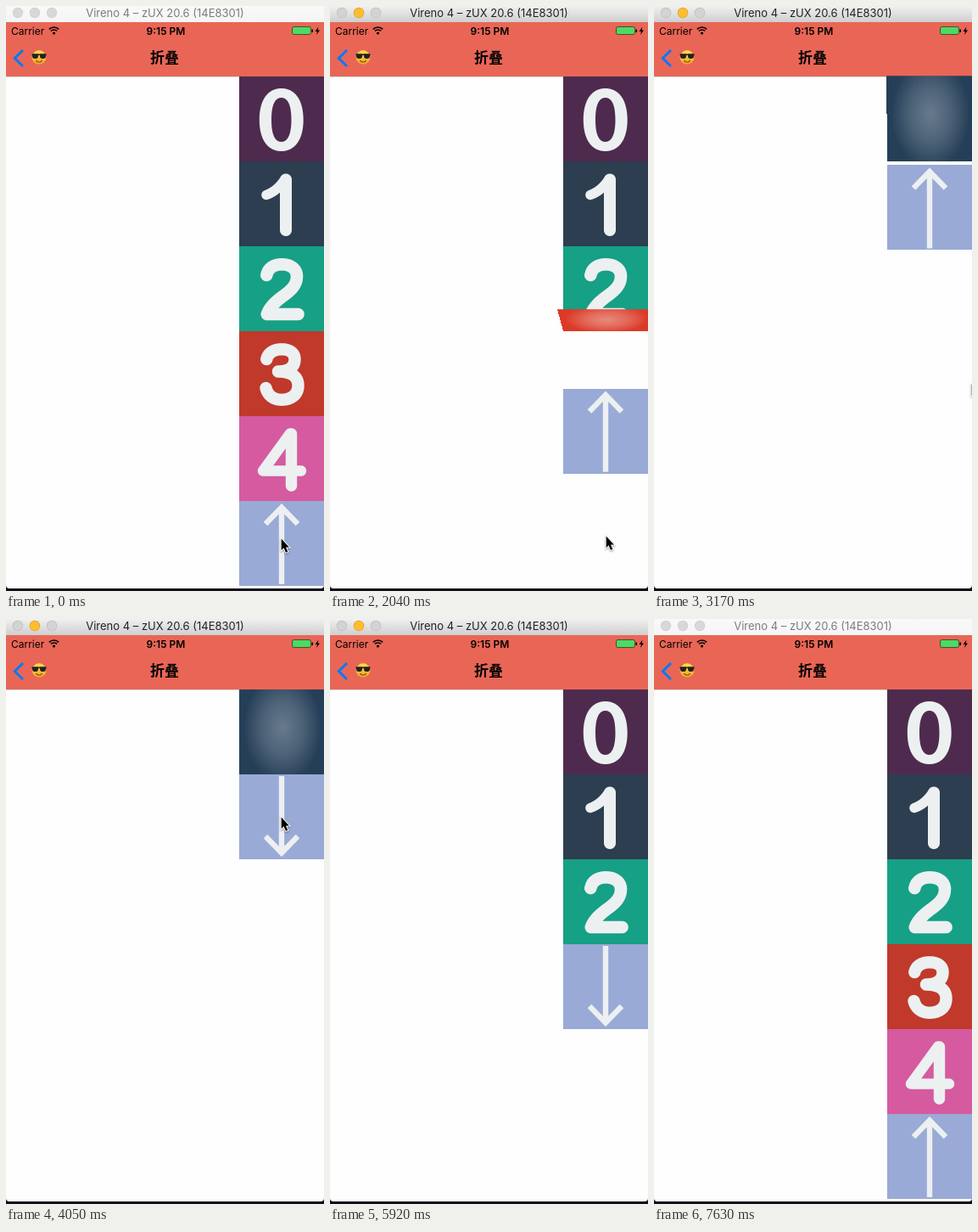
An HTML page with a canvas that plays this animation: 375x689 px, repeating every 7670 ms.

```html
<!DOCTYPE html>
<html lang="zh">
<head>
<meta charset="utf-8">
<title>折叠</title>
<style>
html, body { margin: 0; width: 100%; height: 100%; overflow: hidden; background: #fff; }
canvas { display: block; width: 375px; height: 689px; }
</style>
</head>
<body>
<canvas id="stage" width="375" height="689"></canvas>
<script>
const ctx = document.getElementById('stage').getContext('2d');
const LOOP = 7670;
const SIZE = 100, LEFT = 275, TOP = 83, DEPTH = 800;
const FOLD_MS = 448;
const CLOSE_FLAP = [1281, 1798, 2315, 2790];
const CLOSE_ARROW = [1327, 1864, 2402, 2790];
const OPEN_ARROW = [4910, 5418, 5927, 6331];
const OPEN_LEAD = 12;
const OPEN_FROM = 4500;
const INK = '#ecf0f1';

const FRONT = ['#4e2b4e', '#2d3e50', '#16a085', '#c0392b', '#d65a9f'];
const BACK = [null, ['#263f58', '#687b8d'], ['#00b08b', '#4dc4a8'], ['#dc3a28', '#e88a7c'], ['#fb4aac', '#f596c8']];

const clamp = v => Math.max(0, Math.min(1, v));

// Standard ease-in-out: cubic-bezier(.42, 0, .58, 1)
function ease(x) {
  x = clamp(x);
  let lo = 0, hi = 1;
  for (let i = 0; i < 20; i++) {
    const m = (lo + hi) / 2, n = 1 - m;
    if (1.26 * n * n * m + 1.74 * n * m * m + m * m * m < x) lo = m; else hi = m;
  }
  return lo * lo * (3 - 2 * lo);
}
const foldAt = (t, start) => ease((t - start) / FOLD_MS);
const total = (t, starts) => starts.reduce((sum, s) => sum + foldAt(t, s), 0);

function makeTile(color, paint) {
  const c = document.createElement('canvas');
  c.width = c.height = SIZE * 2;
  const g = c.getContext('2d');
  g.scale(2, 2);
  g.fillStyle = color;
  g.fillRect(0, 0, SIZE, SIZE);
  g.strokeStyle = g.fillStyle = INK;
  g.lineCap = g.lineJoin = 'round';
  paint(g);
  return c;
}

function stroke(g, path, width) {
  g.lineWidth = width;
  g.stroke(new Path2D(path));
}

const DIGITS = [
  g => g.fill(new Path2D(
    'M49.7 14C66 14 75.7 28 75.7 51S66 88 49.7 88S23.8 74 23.8 51S33.5 14 49.7 14Z' +
    'M49.7 25C42 25 38 34 38 51S42 77 49.7 77S61.5 68 61.5 51S57.5 25 49.7 25Z'), 'evenodd'),
  g => {
    stroke(g, 'M55 21.5V81', 14);
    stroke(g, 'M54 21Q45 35 32 39.5', 11.5);
  },
  g => stroke(g, 'M32.3 34C34 25.5 41 21.3 50.5 21.3C61 21.3 68 27 68 35.5C68 45 62 51 54 57C44 64 36 71 32.8 80H69.5', 14.6),
  g => stroke(g, 'M32.3 33C34 25.5 41 21.3 50 21.3C60 21.3 65.5 26 65.5 33C65.5 42 59 47.5 46 47.5C61 47.5 69.5 53 69.5 64C69.5 75 61 80.8 50 80.8C40 80.8 33.5 75 31.5 67', 14.4),
  g => {
    stroke(g, 'M61.5 21V82', 13.4);
    stroke(g, 'M60 20.5L28 64.5H73', 12.4);
  }
];

const fronts = FRONT.map((color, i) => makeTile(color, DIGITS[i]));
const backs = BACK.map(pair => pair && makeTile(pair[0], g => {
  const glow = g.createRadialGradient(0, 0, 0, 0, 0, 46);
  glow.addColorStop(0, pair[1]);
  glow.addColorStop(0.5, pair[1] + '99');
  glow.addColorStop(1, pair[1] + '00');
  g.translate(51, 55);
  g.scale(1, 1.4);
  g.fillStyle = glow;
  g.fillRect(-60, -50, 120, 100);
}));
const arrow = makeTile('#9aaad6', g => {
  g.lineCap = 'butt';
  g.lineJoin = 'miter';
  stroke(g, 'M50 8V98M31 27L50 7.5L69 27', 6.4);
});

const flat = (tile, y) => ctx.drawImage(tile, LEFT, y, SIZE, SIZE);

// Draws a tile hinged on a horizontal edge, one pixel row at a time.
function flap(tile, hinge, angle, depth) {
  const c = Math.cos(angle), n = Math.sin(angle) / depth;
  const end = SIZE * c / (1 - SIZE * n), dir = Math.sign(end), reach = Math.abs(end);
  const source = y => y * dir / (c + y * dir * n);
  for (let y = 0; y < reach; y++) {
    const h = Math.min(1, reach - y);
    const a = source(y), b = Math.min(SIZE, source(y + h));
    const k = 1 / (1 - (a + b) / 2 * n);
    ctx.drawImage(tile, 0, a * 2, SIZE * 2, Math.max(0.01, (b - a) * 2),
      LEFT + SIZE / 2 * (1 - k), dir > 0 ? hinge + y : hinge - y - h, SIZE * k, h);
  }
}

function drawArrow(t) {
  const y = t < OPEN_FROM ? 583 - SIZE * total(t, CLOSE_ARROW) : 183 + SIZE * total(t, OPEN_ARROW);
  ctx.save();
  ctx.translate(LEFT + SIZE / 2, y + SIZE / 2);
  if (t >= 3230 && t < 6800) ctx.rotate(Math.PI);
  ctx.drawImage(arrow, -SIZE / 2, -SIZE / 2, SIZE, SIZE);
  ctx.restore();
}

function drawTiles(t) {
  const moving = [];
  flat(fronts[0], TOP);
  for (let i = 1; i < 5; i++) {
    const hinge = TOP + i * SIZE;
    if (t < OPEN_FROM) {
      const start = CLOSE_FLAP[4 - i], p = foldAt(t, start);
      const covered = i > 1 && t >= CLOSE_FLAP[5 - i];
      if (t <= start) flat(fronts[i], hinge);
      else if (!covered) moving.push(() => flap(p < 0.5 ? fronts[i] : backs[i], hinge, Math.PI * p, DEPTH));
    } else {
      const start = OPEN_ARROW[i - 1] - OPEN_LEAD, p = foldAt(t, start);
      const face = p < 0.5 ? backs[i] : fronts[i];
      if (t >= start + FOLD_MS) flat(fronts[i], hinge);
      else if (i === 1) moving.push(() => flap(face, hinge, Math.PI * (1 - p), DEPTH));
      else if (t > start) moving.push(() => flap(face, hinge, Math.PI / 2 * (1 - p), Infinity));
    }
  }
  moving.forEach(paint => paint());
}

function dot(x, y, r, color) {
  ctx.fillStyle = color;
  ctx.beginPath();
  ctx.arc(x, y, r, 0, 7);
  ctx.fill();
}

function label(text, x, y, font, color = '#000', align = 'center') {
  ctx.font = font;
  ctx.fillStyle = color;
  ctx.textAlign = align;
  ctx.fillText(text, x, y);
}

function drawTitleBar(active) {
  const shade = ctx.createLinearGradient(0, 0, 0, 19);
  shade.addColorStop(0, active ? '#f0f0f0' : '#f9f9f9');
  shade.addColorStop(1, active ? '#cfcfcf' : '#f5f5f5');
  ctx.fillStyle = shade;
  ctx.fillRect(0, 0, 375, 19);
  [14, 34, 54].forEach((x, i) => {
    const lit = active && i === 1;
    dot(x, 8, 6.2, lit ? '#dfa023' : active ? '#bdbdbd' : '#d0d0d0');
    dot(x, 8, 5.5, lit ? '#fdbd2e' : active ? '#d3d3d3' : '#d8d8d8');
  });
  label('Vireno 4 – zUX 20.6 (14E8301)', 187.5, 13, '13px Inter, sans-serif', active ? '#222' : '#7c7c7c');
}

function drawEmoji(x, y) {
  const skin = ctx.createLinearGradient(0, y - 8, 0, y + 8);
  skin.addColorStop(0, '#ffdf4a');
  skin.addColorStop(1, '#f2a32c');
  dot(x, y, 8.3, skin);
  ctx.fillStyle = '#222';
  ctx.fillRect(x - 8.5, y - 4, 17, 1.6);
  ctx.beginPath();
  ctx.roundRect(x - 8, y - 4, 7, 5.5, [0, 0, 3, 3]);
  ctx.roundRect(x + 1, y - 4, 7, 5.5, [0, 0, 3, 3]);
  ctx.fill();
  ctx.strokeStyle = '#7a4312';
  ctx.lineWidth = 1.2;
  ctx.beginPath();
  ctx.arc(x, y + 1.5, 4, 0.5, 2.64);
  ctx.stroke();
}

function drawNavBar() {
  ctx.fillStyle = '#e96656';
  ctx.fillRect(0, 19, 375, 64);
  ctx.fillStyle = '#d8d8d8';
  ctx.fillRect(0, 83, 375, 1);
  label('Carrier', 6, 33.5, '12px Inter, sans-serif', '#000', 'left');
  label('9:15 PM', 188.5, 33.5, '600 12px Inter, sans-serif');

  ctx.strokeStyle = '#000';
  ctx.lineWidth = 1.7;
  [8, 5].forEach(r => {
    ctx.beginPath();
    ctx.arc(56.5, 33, r, -Math.PI * 0.75, -Math.PI * 0.25);
    ctx.stroke();
  });
  dot(56.5, 32, 1.6, '#000');

  ctx.strokeStyle = 'rgba(0,0,0,.75)';
  ctx.lineWidth = 0.7;
  ctx.beginPath();
  ctx.roundRect(337.5, 24.5, 22, 9, 2);
  ctx.fillStyle = '#4cd964';
  ctx.fill();
  ctx.stroke();
  ctx.fillStyle = '#000';
  ctx.fillRect(360.5, 27.5, 1.5, 3.5);
  ctx.fill(new Path2D('M368.5 24.5L364.5 30H367L366 34L370 28.5H367.5Z'));

  ctx.strokeStyle = '#007aff';
  ctx.lineCap = 'butt';
  ctx.lineJoin = 'miter';
  stroke(ctx, 'M20 52L10.3 61.5L20 71', 3);
  drawEmoji(39, 60.5);
  label('折叠', 187, 67, 'bold 17px "Noto Sans CJK SC", "Noto Sans CJK", sans-serif');
}

// Pointer waypoints: time, x, y
const POINTER = [
  [[0, 324, 627], [1500, 324, 627], [2600, 326, 621], [2720, 326, 621], [2840, 331, 610], [3200, 378, 430]],
  [[3490, 375, 196], [3700, 352, 205], [4050, 324, 233], [4760, 324, 233], [5000, 378, 270]]
];

function drawPointer(t) {
  const path = POINTER.find(p => t >= p[0][0] && t < p[p.length - 1][0]);
  if (!path) return;
  const i = path.findIndex(p => p[0] > t), a = path[i - 1], b = path[i];
  const k = (t - a[0]) / (b[0] - a[0]), mix = j => a[j] + (b[j] - a[j]) * k;
  ctx.save();
  ctx.translate(Math.round(mix(1)), Math.round(mix(2)));
  const shape = new Path2D('M.7 .5V14L3.6 11.3L6 16.8L8.4 15.8L6 10.4H10Z');
  ctx.shadowColor = 'rgba(0,0,0,.4)';
  ctx.shadowBlur = 2;
  ctx.shadowOffsetY = 1;
  ctx.strokeStyle = '#fff';
  ctx.lineWidth = 2;
  ctx.stroke(shape);
  ctx.shadowColor = 'transparent';
  ctx.fillStyle = '#000';
  ctx.fill(shape);
  ctx.restore();
}

function draw(t) {
  ctx.fillStyle = '#160c18';
  ctx.fillRect(0, 0, 375, 689);
  ctx.fillStyle = '#fefefe';
  ctx.beginPath();
  ctx.roundRect(0, 0, 375, 686, [0, 0, 4, 4]);
  ctx.fill();
  drawTitleBar(t >= 690 && t < 7630);
  drawNavBar();
  drawArrow(t);
  drawTiles(t);
  drawPointer(t);
}

const began = performance.now();
function frame() {
  draw((performance.now() - began) % LOOP);
  requestAnimationFrame(frame);
}
frame();
</script>
</body>
</html>
```
